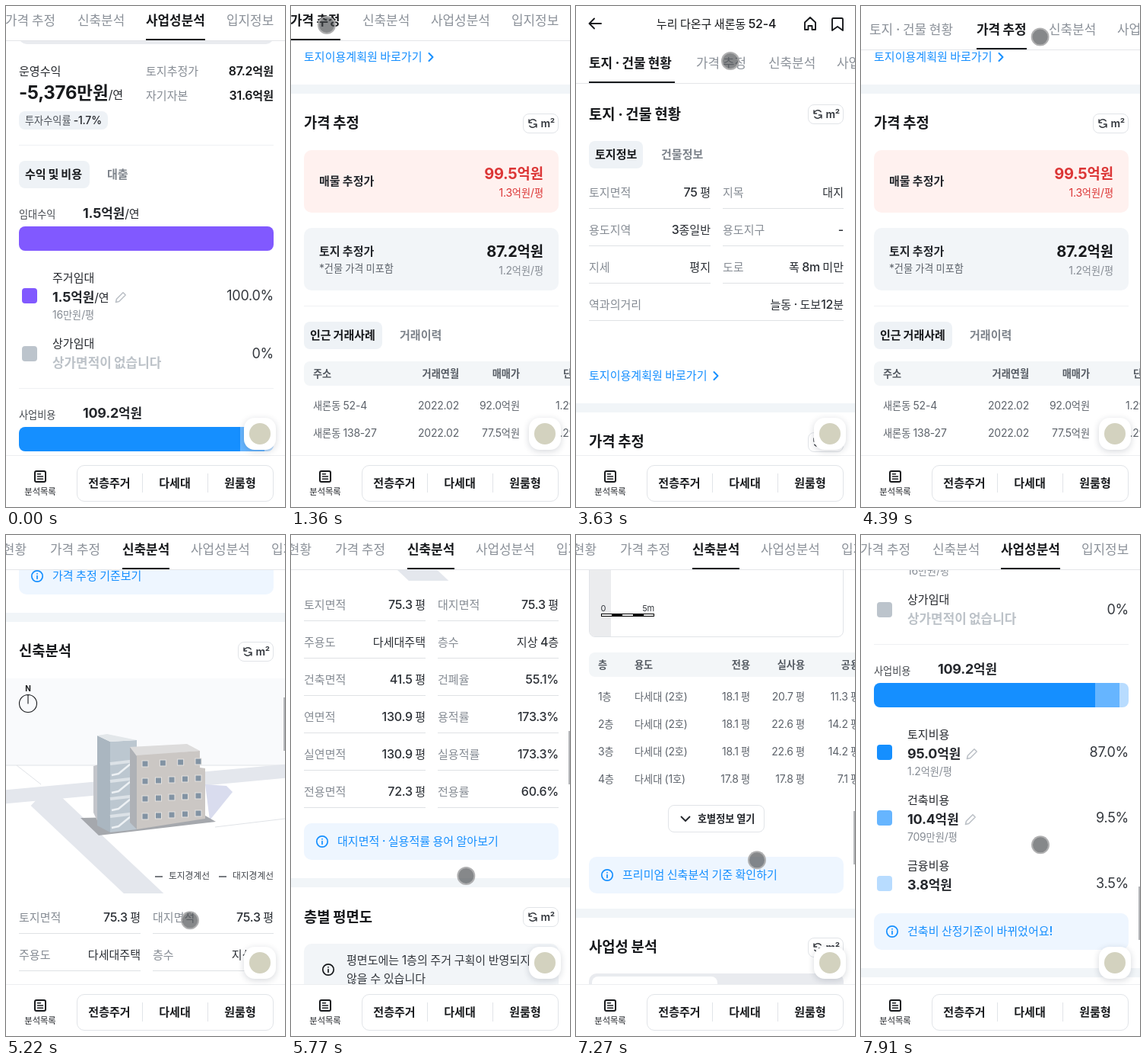
An HTML page that plays this animation: 367 by 657 pixels, repeating every 8 s.

```html
<!DOCTYPE html>
<html lang="ko">
<head>
<meta charset="utf-8">
<title>부동산 분석</title>
<style>
html, body { margin: 0; width: 100%; height: 100%; overflow: hidden; background: #fff; }
#stage { position: relative; width: 367px; height: 657px; overflow: hidden; background: #fff;
  font-family: Inter, "Noto Sans CJK KR", "Noto Sans CJK", sans-serif; }
#stage div, #stage p, #stage svg { position: absolute; box-sizing: border-box; }
p { margin: 0; white-space: pre; line-height: 30px; height: 30px; letter-spacing: -.015em; word-spacing: -.04em; }
.k { font-size: .94em; line-height: 0; letter-spacing: 0; }
svg { overflow: visible; }
#page, #bar, #tabs, #foot { left: 0; top: 0; width: 367px; }
#bar { height: 102px; background: #fff; border-bottom: 1px solid #e4e6e9; overflow: hidden; }
#line { top: 99px; height: 2px; background: #17191c; }
#thumb { right: 0; width: 2px; height: 70px; background: #b4b6b9; }
#dot { left: -12px; top: -12px; width: 24px; height: 24px; border-radius: 50%;
  background: rgba(66, 69, 73, .64); border: 2px solid rgba(190, 190, 190, .75); }
</style>
</head>
<body>
<div id="stage"></div>
<script>
(() => {
const BLACK = '#17191c', INK = '#24272c', DARK = '#33373d', MID = '#5d636b', GRAY = '#868c94';
const BLUE = '#158fff', SKY = '#66b5ff', ICE = '#b8dcff', PURPLE = '#8159ff', PALE = '#f2f5f8', RULE = '#e1e4e8';
let html = '', oy = 0;

const hangul = s => s.replace(/[가-힣]+/g, '<span class="k">$&</span>');
const big = (s, size, w, color = INK) => `<span style="font-size:${size}px;font-weight:${w};color:${color}">${hangul(s)}</span>`;

// y is the middle of the line; x is the left, right or middle edge
function raw(x, y, inner, size = 16, w = 500, color = INK, align = 'l') {
  const pos = align == 'r' ? `right:${367 - x}px` : `left:${x}px` + (align == 'c' ? ';transform:translateX(-50%)' : '');
  html += `<p style="${pos};top:${y + oy - 15}px;font-size:${size}px;font-weight:${w};color:${color}">${inner}</p>`;
}
const text = (x, y, s, ...rest) => raw(x, y, hangul(s), ...rest);
const box = (x, y, w, h, bg, r = 0, extra = '') =>
  html += `<div style="left:${x}px;top:${y + oy}px;width:${w}px;height:${h}px;background:${bg};border-radius:${r}px;${extra}"></div>`;
const outline = (x, y, w, h, r) => box(x, y, w, h, '#fff', r, `border:1px solid ${RULE}`);
const icon = (x, y, d, color = INK, w = 2, rot = 0) =>
  html += `<svg width="1" height="1" style="left:${x}px;top:${y + oy}px"><path transform="rotate(${rot})" d="${d}" fill="none" stroke="${color}" stroke-width="${w}" stroke-linecap="round" stroke-linejoin="round"/></svg>`;
const ring = r => `M${-r} 0a${r} ${r} 0 1 1 ${2 * r} 0a${r} ${r} 0 1 1 ${-2 * r} 0`;

const band = y => box(0, y, 367, 12, '#f1f5f8');
const rule = (y, x = 17, w = 335, c = '#eff1f3') => box(x, y, w, 1, c);
const info = (x, y, c) => icon(x, y, ring(7.2) + 'M0-.3v3.6M0-3.3v.1', c, 1.7);
const pencil = (x, y) => icon(x, y, 'M-6.5 6.5l1-4.2 8.5-8.5 3.2 3.2-8.5 8.5z', '#bcc1c7', 1.6);

function heading(y, s, by = y) {
  text(17, y, s, 20, 700, BLACK);
  outline(305, by - 13, 47, 26, 8);
  icon(318, by, 'M-5-1a5.2 5.2 0 0 1 9.2-2.3M5 1a5.2 5.2 0 0 1-9.2 2.3M-5-5v4h3.6M5 5V1H1.4', DARK, 1.4);
  text(347, by, 'm²', 14, 600, DARK, 'r');
}
function chip(w, y, on, ...off) {
  box(17, y - 17, w, 36, '#eef2f6', 8);
  text(25, y, on, 16, 700, BLACK);
  off.forEach(([x, s]) => text(x, y, s, 16, 600, '#7d838b'));
}
function notice(y, s) {
  box(17, y, 335, 48, '#eef6ff', 10);
  info(41, y + 24, BLUE);
  text(61, y + 23, s, 16, 500, BLUE);
}
function cell(x, w, y, label, value) {
  text(x, y, label, 16, 400, GRAY);
  text(x + w, y, value, 16, 500, '#2b2f35', 'r');
  rule(y + 21, x, w, '#dfe2e5');
}
// cells run left, right, left, right, each written "label:value"
const grid = (y, list) => list.split(', ').forEach((s, i) =>
  cell(i % 2 ? 193 : 17, 160 - i % 2, y + (i >> 1) * 49, ...s.split(':')));
// a negative column is a right edge
const row = (y, cols, list, w = 400, c = MID) => list.split(', ').forEach((s, i) =>
  text(Math.abs(cols[i]), y, s, 14, w, c, cols[i] < 0 ? 'r' : 'l'));
function thead(y, cols, list) {
  box(17, y - 16, 358, 32, '#f3f6f8', 8);
  row(y, cols, list, 600, '#555b63');
}
function item(y, color, name, amount, pct, sub, px, per = '') {
  box(21, y + 14, 20, 20, color, 4);
  text(61, y, name, 16, 400);
  raw(61, y + 26, big(amount, 18, 700) + big(per, 16, 400));
  if (sub) text(61, y + 49, sub, 14, 400, GRAY);
  if (px) pencil(px, y + 26);
  text(352, y + 24, pct, 18, 400, DARK, 'r');
}

function land() {
  heading(142, '토지 · 건물 현황');
  chip(71, 194, '토지정보', [112, '건물정보']);
  grid(244, '토지면적:75 평, 지목:대지, 용도지역:3종일반, 용도지구:-, 지세:평지, 도로:폭 8m 미만');
  cell(17, 335, 391, '역과의거리', '늘동 · 도보12분');
  text(17, 484, '토지이용계획원 바로가기', 16, 500, BLUE);
  icon(184, 485, 'M-2.5-5l5 5-5 5', BLUE);
}

function card(y, bg, name, total, each, c1, c2) {
  box(17, y, 335, 82, bg, 10);
  text(37, name[1] ? y + 30 : y + 40, name[0], 16, 600);
  if (name[1]) text(37, y + 53, name[1], 14, 400, MID);
  text(332, y + 31, total, 20, 700, c1, 'r');
  text(332, y + 56, each, 14, 400, c2, 'r');
}
function price() {
  oy = 418;
  band(103);
  heading(153, '가격 추정', 154);
  card(189, '#fff1ef', ['매물 추정가'], '99.5억원', '1.3억원/평', '#dc3636', '#dc3636');
  card(291, PALE, ['토지 추정가', '*건물 가격 미포함'], '87.2억원', '1.2억원/평', BLACK, GRAY);
  rule(393);
  chip(103, 431, '인근 거래사례', [143, '거래이력']);
  const cols = [29, -221, -301, 348];
  thead(482, [29, -221, -301, 358], '주소, 거래연월, 매매가, 단가');
  row(524, cols, '새론동 52-4, 2022.02, 92.0억원, 1.2억');
  row(560, cols, '새론동 138-27, 2022.02, 77.5억원, 1.2억');
}

function scene() {
  let g = '';
  const path = (d, c, w = 1) => g += `<path d="${d}" fill="none" stroke="${c}" stroke-width="${w}"/>`;
  const fill = (d, c) => g += `<path d="${d}z" fill="${c}"/>`;
  // upright wall between two edges, each with a top and a bottom
  const wall = (x1, t1, b1, x2, t2, b2, c) => fill(`M${x1} ${t1}L${x2} ${t2}V${b2}L${x1} ${b1}`, c);
  fill('M0 189H367V303H0', '#f9fafc');
  path('M14 303L46 328M275 384L367 373M0 303H367', '#e0e3e7');
  path('M-9 345L376 310', '#e4e7ed', 18);
  path('M45 343L195 484', '#e4e7ed', 36);
  fill('M262 328L290 330 298 338 268 375', '#d9dcee');
  fill('M98 372L122 395 276 377 262 369', '#a5a8ad');
  wall(115, 304, 365, 122, 302, 380, '#c3c5ca');
  wall(120, 264, 382, 137, 272, 391, '#aab6c0');
  wall(137, 272, 391, 172, 270, 387, '#bcc7d0');
  fill('M120 264L133 262 172 270 137 272', '#e3e7ea');
  for (let y = 306; y < 390; y += 23) {
    path(`M137 ${y - 5}L171 ${y - 9}`, '#dce2e7', 4);
    path(`M139 ${y + 10}L148 ${y + 8}L164 ${y - 5}H171`, '#edf1f4', 2.5);
  }
  wall(163, 279, 378, 172, 290, 387, '#aeb1b6');
  fill('M163 279L238 275 255 284 172 291', '#dddcdc');
  wall(172, 290, 387, 255, 284, 374, '#cbc7c4');
  wall(255, 306, 374, 262, 307, 373, '#cbc7c4');
  for (let r = 0; r < 4; r++) {
    const n = r ? 5 : 4;
    for (let c = 0; c < n; c++) {
      const x = 179 + c * 70 / (n - 1), y = 297 + r * 23 - c;
      g += `<rect x="${x}" y="${y}" width="8" height="8" fill="#8293a3" stroke="#e4e2e0"/>`;
    }
  }
  html += `<svg width="367" height="282" viewBox="0 189 367 282" style="overflow:hidden;left:0;top:${189 + oy}px">${g}</svg>`;
}

function plan() {
  outline(17, 469, 335, 446, 8);
  box(18, 470, 28, 444, '#ebecee', 0, 'border-radius:7px 0 0 7px');
  icon(57, 503, ring(11.5) + 'M0 0V-11.5', BLACK, 1.1, 18);
  icon(63, 485, 'M-2.5 3.5v-7l5 7v-7', BLACK, 1.5, 18);
  text(36, 877, '0', 11, 400, DARK, 'c');
  text(103, 877, '5m', 11, 400, DARK, 'r');
  box(33, 884, 70, 4, 'repeating-linear-gradient(90deg,#fff 0 13px,#000 13px 27px,#fff 27px 28px)', 0, 'border:1px solid #000');
}

function build() {
  oy = 1997;
  notice(31, '가격 추정 기준보기');
  band(103);
  heading(153, '신축분석', 154);
  scene();
  text(29, 202, 'N', 10, 700, BLACK, 'c');
  icon(29, 222, ring(11.5) + 'M0 0V-11', BLACK, 1.1);
  ['토지경계선', '대지경계선'].forEach((s, i) => {
    box(196 + i * 84, 448, 10, 1.5, '#777b80');
    text(214 + i * 84, 448, s, 12.5, 400, '#43474d');
  });
  grid(502, '토지면적:75.3 평, 대지면적:75.3 평, 주용도:다세대주택, 층수:지상 4층, 건축면적:41.5 평, 건폐율:55.1%, ' +
    '연면적:130.9 평, 용적률:173.3%, 실연면적:130.9 평, 실용적률:173.3%, 전용면적:72.3 평, 전용률:60.6%');

  oy = 2619;
  notice(167, '대지면적 · 실용적률 용어 알아보기');
  band(239);
  heading(290, '층별 평면도');
  box(17, 325, 335, 68, PALE, 10);
  info(49, 359, BLACK);
  text(73, 346, '평면도에는 1층의 주거 구획이 반영되지', 16, 400, DARK);
  text(73, 370, '않을 수 있습니다', 16, 400, DARK);
  chip(37, 430, '1층', [78, '2층'], [134, '3층'], [190, '4층']);
  plan();

  oy = 3399;
  const cols = [29, 77, -229, -301, -373];
  thead(171, cols, '층, 용도, 전용, 실사용, 공용');
  ['(2호), 18.1 평, 20.7 평, 11.3 평', '(2호), 18.1 평, 22.6 평, 14.2 평',
    '(2호), 18.1 평, 22.6 평, 14.2 평', '(1호), 17.8 평, 17.8 평, 7.1 평']
    .forEach((s, i) => row(213 + i * 36, cols, `${i + 1}층, 다세대 ${s}`));
  outline(121, 355, 127, 36, 8);
  icon(144, 373, 'M-5.5-2.5l5.5 5.5 5.5-5.5', INK, 1.8);
  text(160, 373, '호별정보 열기', 14, 600);
  notice(423, '프리미엄 신축분석 기준 확인하기');
}

function business() {
  oy = 3399;
  band(491);
  heading(541, '사업성 분석', 542);
  box(17, 576, 335, 45, '#e9ebef', 10);
  box(21, 580, 165, 37, '#fff', 8);
  text(103, 598, '임대', 16, 600, INK, 'c');
  text(268, 598, '분양', 16, 500, GRAY, 'c');

  oy = 3970;
  text(17, 85, '운영수익', 16, 400);
  raw(17, 114, big('-5,376만원', 24, 700, BLACK) + big('/연', 16, 400));
  [['토지추정가', '87.2억원'], ['자기자본', '31.6억원']].forEach(([a, b], i) => {
    text(184, 85 + i * 32, a, 16, 400, GRAY);
    text(352, 85 + i * 32, b, 16, 600, BLACK, 'r');
  });
  box(17, 138, 117, 24, '#eef2f6', 8);
  raw(25, 150, big('투자수익률 ', 14, 400, '#4a4f56') + big('-1.7%', 14, 500), 14);
  rule(182);
  chip(93, 220, '수익 및 비용', [133, '대출']);
  text(17, 273, '임대수익', 14, 400, '#43474d');
  raw(101, 272, big('1.5억원', 18, 700) + big('/연', 16, 400));
  box(17, 289, 335, 32, PURPLE, 8);
  item(356, PURPLE, '주거임대', '1.5억원', '100.0%', '16만원/평', 151, '/연');
  box(21, 446, 20, 20, '#bcc4cc', 4);
  text(61, 442, '상가임대', 16, 400);
  text(61, 468, '상가면적이 없습니다', 18, 700, '#bcc2c8');
  text(352, 456, '0%', 18, 400, DARK, 'r');
  rule(501);
  text(17, 536, '사업비용', 14, 400, '#43474d');
  text(101, 534, '109.2억원', 18, 700);
  box(17, 552, 335, 32, `linear-gradient(90deg,${BLUE} 87%,${SKY} 87% 96.5%,${ICE} 96.5%)`, 8);

  oy = 4328;
  item(261, BLUE, '토지비용', '95.0억원', '87.0%', '1.2억원/평', 146);
  item(347, SKY, '건축비용', '10.4억원', '9.5%', '709만원/평', 144);
  item(433, ICE, '금융비용', '3.8억원', '3.5%');
  notice(496, '건축비 산정기준이 바뀌었어요!');
  band(568);
}

const TABS = [[17, 113, '토지 · 건물 현황'], [158, 66, '가격 추정'], [253, 62, '신축분석'], [343, 78, '사업성분석'], [449, 62, '입지정보']];
// the strip scrolls to centre the chosen tab
const shift = i => Math.max(0, Math.min(159, TABS[i][0] + TABS[i][1] / 2 - 184));

function header() {
  icon(25, 23, 'M8 0H-7M-1-6.5L-7.5 0l6.5 6.5', BLACK, 1.9);
  text(184.5, 23, '누리 다온구 새론동 52-4', 16, 500, BLACK, 'c');
  icon(308, 23, 'M-7-1.5L0-8l7 6.5V8H2.5V3h-5v5H-7z', BLACK, 1.9);
  icon(344, 24, 'M-7-6.5q0-1.5 1.5-1.5h11q1.5 0 1.5 1.5V8L0 3-7 8z', BLACK, 1.9);
}
function footer() {
  box(0, 589, 367, 68, '#fff', 0, 'border-top:1px solid #eceef0');
  box(37, 609, 16, 16, '#fff', 3, `border:2px solid ${BLACK}`);
  icon(45, 617, 'M-3.5-3.2h4M-3.5 0h7M-3.5 3.2h7', BLACK, 1.6);
  text(45, 637, '분석목록', 12, 400, INK, 'c');
  outline(93, 602, 259, 48, 10);
  ['전층주거', '다세대', '원룸형'].forEach((s, i) => {
    text(136 + i * 86, 625, s, 16, 600, BLACK, 'c');
    if (i) box(93 + i * 86, 613, 1, 25, RULE);
  });
  box(313, 540, 42, 42, '#fff', 14, 'box-shadow:0 2px 8px rgba(30,40,60,.18)');
  box(320, 547, 28, 28, '#d3d2bf', 14);
}

// collects the markup of some drawing functions
function part(...fns) {
  html = '';
  fns.forEach(fn => { oy = 0; fn(); });
  return html;
}
const strip = () => TABS.forEach(([x, , s]) => text(x, 75, s, 18));

const $ = id => document.getElementById(id);
$('stage').innerHTML = `<div id="page">${part(land, price, build, business)}</div>
<div id="bar">${part(header)}<div id="tabs">${part(strip)}<div id="line"></div></div></div>
<div id="thumb"></div><div id="foot">${part(footer)}</div><div id="dot"></div>`;
const labels = [...$('tabs').querySelectorAll('p')];

// clicks: time, scroll, tab, header hidden; the last one is passed by scrolling
const VIEWS = [[0, 3970, 3, 1], [1360, 418, 1, 0], [2470, 0, 0, 0], [4250, 418, 1, 1], [4600, 1997, 2, 1], [7530, 0, 3, 1]];
const DRAG = 5220;
const SCROLL = [[DRAG, 1997], [5800, 2430], [6260, 2530], [6450, 2619], [7270, 3399], [7910, 4328]];
const FLICKS = [[DRAG, 242, 506], [6450, 212, 400], [7270, 238, 427], [7910, 236, 407]];
const POINTER = [[130, 348, 662], [890, 47, 17], [1020, 47, 25], [1360, 47, 25], [1750, 75, 110], [2330, 35, 77],
  [2670, 36, 78], [3100, 300, 310], [3360, 298, 310], [3630, 203, 72], [4050, 182, 68], [4250, 182, 68],
  [4500, 272, 22], [4600, 272, 22],
  ...FLICKS.flatMap(([t, x, y]) => [[t - 190, x, y + 80], [t + 190, x, y - 80]])];

const clamp = u => Math.max(0, Math.min(1, u));
const smooth = u => u * u * (3 - 2 * u);
const last = (keys, t) => keys.reduce((n, k, i) => k[0] <= t ? i : n, 0);

function at(keys, t, col, ease = u => u) {
  const i = last(keys, t), a = keys[i], b = keys[i + 1];
  return b ? a[col] + (b[col] - a[col]) * ease(clamp((t - a[0]) / (b[0] - a[0]))) : a[col];
}

function draw(t) {
  const n = last(VIEWS, t), view = VIEWS[n], before = VIEWS[Math.max(0, n - 1)];
  const u = smooth(clamp((t - view[0]) / 200));
  const glide = (col, f) => Math.round(f(before[col]) + (f(view[col]) - f(before[col])) * u);
  const dragging = t > DRAG, tab = view[2];
  const s = dragging ? at(SCROLL, t, 1) : view[1];

  $('page').style.transform = `translateY(${-Math.round(s)}px)`;
  $('bar').style.transform = `translateY(${-glide(3, v => v * 56)}px)`;
  $('tabs').style.transform = `translateX(${-glide(2, shift)}px)`;
  labels.forEach((p, i) => {
    p.style.fontWeight = i == tab ? 700 : 500;
    p.style.color = i == tab ? BLACK : '#8b9199';
  });
  $('line').style.left = TABS[tab][0] + 'px';
  $('line').style.width = TABS[tab][1] + 'px';

  $('thumb').style.top = s * 657 / 6166 + 'px';
  $('thumb').style.display = dragging ? '' : 'none';

  const next = VIEWS[n + 1], pressed = !dragging && next && next[0] - t < 130;
  $('dot').style.display = t >= 130 ? '' : 'none';
  $('dot').style.transform =
    `translate(${at(POINTER, t, 1, smooth)}px,${at(POINTER, t, 2, smooth)}px) scale(${pressed ? 1.25 : 1})`;
}

const start = performance.now();
function tick() {
  draw((performance.now() - start) % 8000);
  requestAnimationFrame(tick);
}
tick();
})();
</script>
</body>
</html>
```
